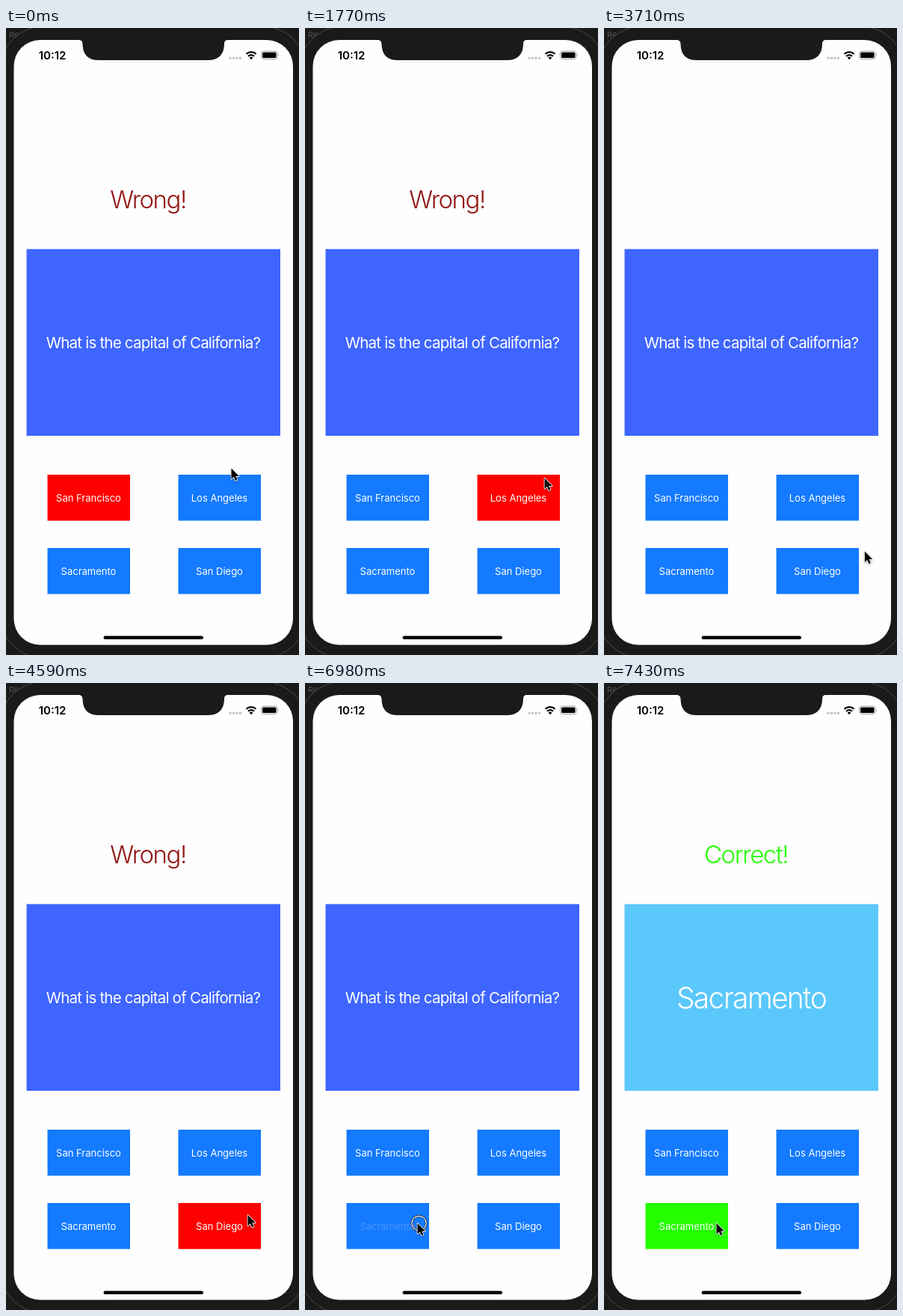
An HTML page that plays this animation: 392 px wide and 838 px high, repeating every 8000 ms.

```html
<!DOCTYPE html>
<html lang="en">
<head>
<meta charset="utf-8">
<title>Quiz</title>
<style>
  html, body { margin: 0; width: 100%; height: 100%; overflow: hidden; background: #1a1a1a; }
  svg { display: block; width: 392px; height: 838px; }
  text { font-family: Inter, "Open Sans", sans-serif; fill: #fff; text-anchor: middle; }
  .button text { font-size: 13px; }
  .verdict { font-size: 33px; font-weight: 350; letter-spacing: -.045em; }
  .question { font-size: 20.5px; letter-spacing: -.038em; }
  .answer { font-size: 39px; font-weight: 350; letter-spacing: -.044em; }
</style>
</head>
<body>
<svg viewBox="0 0 392 838">
  <rect width="392" height="838" fill="#1a1a1a"/>
  <text x="4" y="13" style="font-size:11px;fill:#555;text-anchor:start">Re</text>
  <rect x="-8" y="-2" width="410" height="844" rx="58" fill="#1a1a1a" stroke="#4a4a4a"/>
  <rect x="10.5" y="16" width="373.5" height="808.5" rx="35" fill="#fefefe"/>
  <path d="M96 15.500C101 16 102.500 18 102.500 22C103 36 110 43 124 43H270C284 43 291.500 36 292 22C292 18 293 16 298 15.500Z" fill="#1a1a1a"/>

  <text x="62" y="42" style="font-size:15px;font-weight:600;fill:#000">10:12</text>
  <path d="M300 40.300h14" stroke="#c4c4c4" stroke-width="3.600" stroke-linecap="round" stroke-dasharray="0 4.500"/>
  <path d="M321.500 34.800a9.300 9.300 0 0 1 13 0M324 37.800a5.800 5.800 0 0 1 8 0" fill="none" stroke="#000" stroke-width="2.200"/>
  <path d="M328 42.200l-2.300-2.500a3.300 3.300 0 0 1 4.600 0z"/>
  <rect x="341.500" y="31" width="21.500" height="10.500" rx="3" fill="none" stroke="#a0a0a0"/>
  <rect x="343" y="32.500" width="18.500" height="7.500" rx="1.600"/>
  <path d="M364 34.500q1.600 1.700 0 3.500z" fill="#a0a0a0"/>

  <text id="verdict" class="verdict" x="190" y="241"></text>
  <rect id="card" x="27.500" y="295.500" width="339.500" height="249.500"/>
  <text id="cardText" x="197"></text>
  <g id="buttons"></g>
  <rect x="130.500" y="812.500" width="133.500" height="4.500" rx="2.250"/>

  <g id="cursor">
    <g id="ring" fill="none">
      <circle cx="2" r="9.700" stroke="#111" stroke-width="2.400"/>
      <circle cx="2" r="9.700" stroke="#fff" stroke-width="1.200"/>
    </g>
    <path d="M0 0V14.500L3.300 11.500L5.600 16.600L8 15.600L5.800 10.600H10.300Z" stroke="#fff" stroke-width="1.600"
      stroke-linejoin="round" paint-order="stroke" style="filter:drop-shadow(0 1px 1px #0005)"/>
  </g>
</svg>
<script>
  const LOOP = 8000;
  const TICK = 148.5;      // the picture is refreshed once per tick
  const FEEDBACK = 14;     // ticks that a verdict stays on screen
  const BLUE = '#147aff', RED = '#ff0000', GREEN = '#26ff00';
  const $ = id => document.getElementById(id);

  function addButton(label, column, row) {
    const x = 55.5 + 175 * column, y = 597 + 98 * row;
    const group = document.createElementNS('http://www.w3.org/2000/svg', 'g');
    group.setAttribute('class', 'button');
    group.innerHTML = `<rect x="${x}" y="${y}" width="110.5" height="61.5"/>
      <text x="${x + 55}" y="${y + 36}">${label}</text>`;
    $('buttons').append(group);
    return { box: group.firstElementChild, text: group.lastElementChild };
  }

  // Ticks at which each button is released; the press is one tick earlier.
  const answers = [
    { ...addButton('San Francisco', 0, 0), release: -8 },
    { ...addButton('Los Angeles', 1, 0), release: 10 },
    { ...addButton('San Diego', 1, 1), release: 29 },
    { ...addButton('Sacramento', 0, 1), release: 48, correct: true }
  ];

  const start = [301.5, 588.5];
  const moves = [
    { from: 0, to: 2, end: [322, 596.5] },
    { from: 6, to: 8, end: [320.5, 601.5] },
    { from: 21, to: 27, end: [323.5, 711], bend: [390, 700] },
    { from: 42, to: 47, end: [150.5, 722] }
  ];

  const clamp = v => Math.min(1, Math.max(0, v));
  const ease = v => v * v * (3 - 2 * v);

  function cursorAt(tick) {
    let point = start;
    for (const { from, to, end, bend = end.map((v, i) => (v + point[i]) / 2) } of moves) {
      const p = ease(clamp((tick - from) / (to - from)));
      point = point.map((v, i) => (1 - p) ** 2 * v + 2 * p * (1 - p) * bend[i] + p * p * end[i]);
    }
    return point;
  }

  function showCard(solved) {
    $('card').setAttribute('fill', solved ? '#5bc8fc' : '#3e65ff');
    $('cardText').setAttribute('class', solved ? 'answer' : 'question');
    $('cardText').setAttribute('y', solved ? 435 : 428);
    $('cardText').textContent = solved ? 'Sacramento' : 'What is the capital of California?';
  }

  function draw(tick) {
    let shown = null, pressed = false;
    for (const answer of answers) {
      const age = tick - answer.release;
      const active = age >= 0 && age < FEEDBACK;
      answer.box.setAttribute('fill', !active ? BLUE : answer.correct ? GREEN : RED);
      answer.text.setAttribute('opacity', age < -1 ? 1 : .2 + .8 * clamp(age / 2));
      if (active) shown = answer;
      if (age === -1) pressed = true;
    }
    const solved = Boolean(shown && shown.correct);
    $('verdict').textContent = !shown ? '' : solved ? 'Correct!' : 'Wrong!';
    $('verdict').style.fill = solved ? GREEN : '#921616';
    showCard(solved);
    $('ring').setAttribute('opacity', pressed ? 1 : 0);
    $('cursor').setAttribute('transform', `translate(${cursorAt(tick)})`);
  }

  const origin = performance.now();
  function frame() {
    const time = (performance.now() - origin) % LOOP;
    draw(Math.floor((time + 14) / TICK));
    requestAnimationFrame(frame);
  }
  frame();
</script>
</body>
</html>
```
